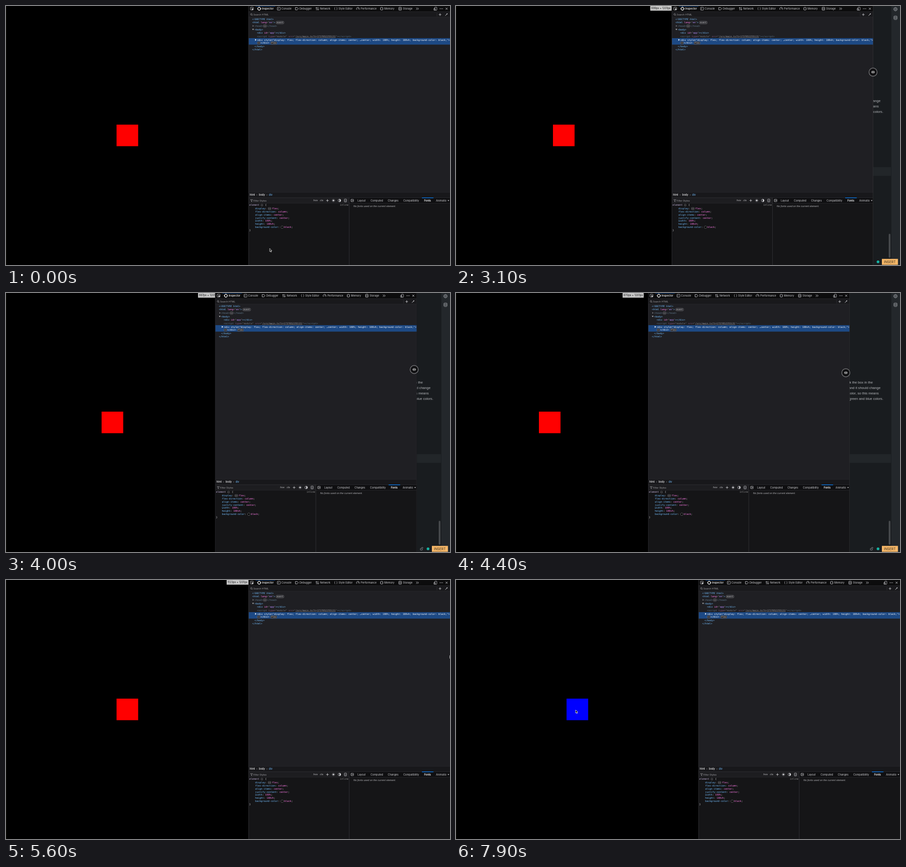
These frames come from a looping animation (980x572 px, 8 s). An HTML page with a canvas:

```html
<!DOCTYPE html>
<html lang="en">
<head>
<meta charset="utf-8">
<title>Resize and click</title>
<style>
html, body { margin: 0; width: 100%; height: 100%; overflow: hidden; background: #000; }
canvas { display: block; width: 980px; height: 572px; }
</style>
</head>
<body>
<canvas id="stage" width="980" height="572"></canvas>
<script>
const ctx = document.getElementById('stage').getContext('2d');
const LOOP = 8000, STEP = 100, PANE = 535, LAG = 29;
const UI = 'Inter, "Noto Sans", sans-serif';
const MONO = '"DejaVu Sans Mono", monospace';
const CH = 3.155;
const BLUE = '#75bfff', PINK = '#ff7de9', VIOLET = '#b98eff', GREY = '#939395', LIGHT = '#d7d7db', DIM = '#77777c';

// Window edge offset: turning points of the drag
const drag = [[1850, 0], [2300, -260], [2550, -100], [2800, -185], [3085, -58.5], [3400, -140],
  [3700, -16], [4300, -131], [4660, -20], [5060, -105], [5370, 0]];
// Pointer paths: time, x, y
const gripPath = [[1850, 980, 150], [2300, 712, 148], [2550, 872, 147], [2800, 790, 146], [3085, 921, 146],
  [3400, 835, 150], [3700, 961, 162], [4300, 841, 176], [4660, 950, 177], [5060, 849, 177], [5370, 980, 170]];
const arrowPath = [[0, 582, 535.5], [200, 582, 535], [850, 258, 284], [1000, 264, 287], [1300, 264, 287], [1650, 990, 160]];
const returnPath = [[5700, 990, 170], [6300, 248, 298], [6800, 228, 300], [7200, 262, 290], [7500, 264, 287]];

function track(keys, t, i = 1) {
  if (t <= keys[0][0]) return keys[0][i];
  for (let k = 1; k < keys.length; k++) {
    const a = keys[k - 1], b = keys[k];
    if (t <= b[0]) {
      const p = (t - a[0]) / (b[0] - a[0]);
      return a[i] + (b[i] - a[i]) * (1 - Math.cos(Math.PI * p)) / 2;
    }
  }
  return keys[keys.length - 1][i];
}

const follow = (path, t) => [track(path, t), track(path, t, 2)];

function rect(x, y, w, h, color) {
  ctx.fillStyle = color;
  ctx.fillRect(x, y, w, h);
}

function disc(x, y, r, color) {
  ctx.fillStyle = color;
  ctx.beginPath();
  ctx.arc(x, y, r, 0, 7);
  ctx.fill();
}

function text(s, x, y, color, size = 5.6, font = UI, style = '', align = 'left') {
  ctx.font = `${style} ${size}px ${font}`;
  ctx.fillStyle = color;
  ctx.textAlign = align;
  ctx.fillText(s, x, y);
}

// Runs of code: text, color, text, color ...
function code(x, y, ...runs) {
  for (let i = 0; i < runs.length; i += 2) {
    text(runs[i], x, y + 1.8, runs[i + 1], 5.24, MONO);
    x += runs[i].length * CH;
  }
}

function line(color, width, ...pts) {
  ctx.strokeStyle = color;
  ctx.lineWidth = width;
  ctx.beginPath();
  for (let i = 0; i < pts.length; i += 2) ctx.lineTo(pts[i], pts[i + 1]);
  ctx.stroke();
}

function ring(x, y, r, color, width = 0.8, from = 0, to = Math.PI * 2) {
  ctx.strokeStyle = color;
  ctx.lineWidth = width;
  ctx.beginPath();
  ctx.arc(x, y, r, from, to);
  ctx.stroke();
}

function box(x, y, w, h, r, color, width = 0.8) {
  ctx.strokeStyle = color;
  ctx.lineWidth = width;
  ctx.beginPath();
  ctx.roundRect(x, y, w, h, r);
  ctx.stroke();
}

function poly(fill, ...pts) {
  ctx.fillStyle = fill;
  ctx.beginPath();
  for (let i = 0; i < pts.length; i += 2) ctx.lineTo(pts[i], pts[i + 1]);
  ctx.closePath();
  ctx.fill();
}

function dots(x, y, gap, r, color) {
  for (let i = -1; i < 2; i++) disc(x + i * gap, y, r, color);
}

function plus(x, y, r, color) {
  line(color, 0.9, x - r, y, x + r, y);
  line(color, 0.9, x, y - r, x, y + r);
}

function rays(x, y, from, to, color, width) {
  for (let i = 0; i < 8; i++) {
    const u = Math.cos(i * Math.PI / 4), v = Math.sin(i * Math.PI / 4);
    line(color, width, x + from * u, y + from * v, x + to * u, y + to * v);
  }
}

function pill(s, x, y, w) {
  ctx.fillStyle = '#29292d';
  ctx.beginPath();
  ctx.roundRect(x, y - 3, w, 6, 2.5);
  ctx.fill();
  box(x, y - 3, w, 6, 2.5, '#8f8f94', 0.5);
  if (s) text(s, x + w / 2, y + 1.6, '#e0e0e4', 4.7, MONO, '', 'center');
  else dots(x + w / 2, y, 1.5, 0.5, '#e0e0e4');
}

function database(x, y, c, w = 3.2) {
  for (const d of [-3, -1, 1, 3]) {
    ctx.strokeStyle = c;
    ctx.lineWidth = 0.8;
    ctx.beginPath();
    ctx.ellipse(x, y + d, w, 1.1, 0, d < -2 ? Math.PI : 0, d < -2 ? Math.PI * 3 : Math.PI);
    ctx.stroke();
  }
  line(c, 0.8, x - w, y - 3, x - w, y + 3);
  line(c, 0.8, x + w, y - 3, x + w, y + 3);
}

function editor() {
  rect(600, 0, 380, 572, '#191c1f');
  rect(600, 356, 360, 19, '#222629');
  rect(961, 0, 19, 572, '#23272b');
  [['Click the box in the', 920, 197], ['center and it should change', 937, 209],
    ['its color, so this means', 933, 221], ['red, green and blue colors.', 943, 233]].forEach(([s, x, y]) =>
    text(s, x, y + 2.6, '#b5b7bb', 7.6, '"Liberation Sans", sans-serif', '', 'right'));
  const c = '#a2a5aa';
  ring(970, 7, 3.6, c, 1);
  ring(970, 7, 1.5, c, 0.8);
  rays(970, 7, 3.5, 4.4, c, 0.9);
  database(970, 26, c, 3.5);
  ctx.fillStyle = '#44474a';
  ctx.beginPath();
  ctx.roundRect(955, 503, 4, 53, 2);
  ctx.fill();
  box(914.5, 564, 4.5, 3.8, 0.7, c);
  ring(919, 563.5, 1.7, c, 0.8, Math.PI, Math.PI * 2);
  disc(931.5, 565, 3, '#16b3a4');
  rect(940, 558.5, 35.5, 13, '#f6b768');
  text('INSERT', 957.5, 567.7, '#39301f', 7.2, UI, '', 'center');
}

function toolbar() {
  rect(535, 0, 445, 12, '#0c0c0d');
  rect(551, 0, 43, 1, '#0b3f82');
  rect(535, 12, 445, 0.6, '#38383d');
  const c = '#cfcfd3';
  [['Console', 608], ['Debugger', 648], ['Network', 693], ['Style Editor', 734],
    ['Performance', 783], ['Memory', 835], ['Storage', 876]].forEach(([s, x]) => text(s, x, 8, c, 5.7));
  text('Inspector', 565, 8, '#fff', 5.7, UI, '500');
  box(539.5, 2.7, 6.5, 6.2, 1, c);
  poly('#fff', 542, 4.8, 546.5, 7, 544.3, 7.4, 543.6, 9.8);
  box(556, 3.2, 5.6, 5.6, 1.4, '#fff', 1.1);
  for (const d of [-3.6, 3.6]) {
    line('#fff', 1, 558.8 + d, 5, 558.8 + d, 7);
    line('#fff', 1, 557.8, 6 + d, 559.8, 6 + d);
  }
  box(598.8, 2.8, 6.6, 6.4, 1, c);
  line(c, 0.8, 600.4, 4.5, 602, 6, 600.4, 7.5);
  line(c, 0.9, 638.8, 3.4, 643, 3.4, 645.4, 6, 643, 8.6, 638.8, 8.6, 638.8, 3.1);
  line(c, 0.9, 685.2, 9.4, 685.2, 2.9);
  line(c, 0.9, 683.6, 4.7, 685.2, 2.9, 686.8, 4.7);
  line(c, 0.9, 688.7, 2.6, 688.7, 9.1);
  line(c, 0.9, 687.1, 7.3, 688.7, 9.1, 690.3, 7.3);
  text('{ }', 728, 8.2, c, 6.8, UI, '', 'center');
  ring(776.7, 6.3, 3.3, c, 0.9, Math.PI * 0.8, Math.PI * 2.2);
  line(c, 0.9, 776.5, 7, 778.3, 4.4);
  box(827, 3, 4.4, 6, 1, c);
  for (const y of [4.3, 6, 7.7]) {
    line(c, 0.6, 825.7, y, 827, y);
    line(c, 0.6, 831.4, y, 832.7, y);
  }
  box(867, 2.6, 5.8, 6.8, 1, c);
  for (const y of [5, 7.2]) line(c, 0.7, 867, y, 872.8, y);
  for (const x of [905.3, 908.3]) line(c, 0.9, x, 3.6, x + 2.3, 6, x, 8.4);
  box(946.3, 2.6, 4.6, 6.8, 0.8, c);
  box(944.3, 5.3, 3, 4.1, 0.6, c);
  dots(960.8, 6, 2.7, 0.8, c);
  line(c, 0.9, 970.3, 3.8, 974.7, 8.2);
  line(c, 0.9, 970.3, 8.2, 974.7, 3.8);
}

function markup() {
  rect(535, 12.6, 445, 12, '#19191c');
  rect(535, 24.5, 445, 0.5, '#303035');
  ring(541.5, 18.4, 1.8, '#b1b1b3', 0.7);
  line('#b1b1b3', 0.8, 542.8, 19.7, 544.4, 21.3);
  text('Search HTML', 546, 20.9, '#a0a0a4', 5.24);
  rect(950.8, 15, 0.6, 8, '#38383d');
  plus(958, 19, 2.8, '#cfcfd3');
  line('#cfcfd3', 1, 969.5, 21.5, 973, 18);
  line('#cfcfd3', 1.7, 972.5, 18.5, 974.3, 16.7);

  text('<!DOCTYPE html>', 543.5, 30.8, BLUE, 5.24, MONO, 'italic');
  code(543.5, 36.5, '<html ', BLUE, 'lang', PINK, '="', GREY, 'en', VIOLET, '"', GREY, '>', BLUE);
  pill('event', 596, 36.6, 17.5);
  poly(DIM, 544.4, 42.1, 547.2, 44, 544.4, 45.9);
  code(548.5, 44, '<head>', '#5b7285');
  pill('', 568, 44.2, 7);
  code(576, 44, '</head>', '#5b7285');
  poly('#b1b1b3', 543.3, 50.6, 547.3, 50.6, 545.3, 53.5);
  code(548.5, 51.8, '<body>', BLUE);
  code(554, 59.5, '<div ', BLUE, 'id', PINK, '="', GREY, 'app', VIOLET, '"', GREY, '></div>', BLUE);
  code(554, 67, '<script ', '#5b7285', 'type', '#80577e', '="module" ', DIM, 'src', '#80577e', '="', DIM,
    '/src/main.ts?t=1737052255131', '#9a9aa0', '"', DIM, '><\/script>', '#5b7285');
  line('#9a9aa0', 0.4, 554 + 27 * CH, 69.8, 554 + 55 * CH, 69.8);
  rect(535.6, 71, 445, 14.3, '#1d4984');
  poly('#fff', 549.8, 72.7, 552.8, 74.8, 549.8, 76.9);
  code(554, 74.8, '<div style="display: flex; flex-direction: column; align-items: center; …center; ' +
    'width: 100%; height: 100vh; background-color: black;">', '#fff');
  pill('', 554.3, 81.6, 7);
  code(562, 81.5, '</div>', '#fff');
  pill('flex', 584, 81.6, 14);
  code(548.5, 89, '</body>', BLUE);
  code(543.5, 96.6, '</html>', BLUE);
}

function rules() {
  rect(535, 411, 445, 0.6, '#38383d');
  rect(535, 411.6, 445, 11.6, '#18181b');
  text('html', 538, 419, '#f0f0f2', 5.5, UI, '500');
  text('body', 558.3, 419, '#f0f0f2', 5.5, UI, '500');
  text('div', 580.3, 419, BLUE, 5.5);
  for (const x of [553, 575.3]) line(GREY, 0.7, x, 416, x + 1.3, 417.3, x, 418.6);
  rect(535, 423, 222, 12, '#1d1d20');
  rect(757, 423, 223, 12, '#0f0f11');
  rect(535, 423, 445, 0.6, '#38383d');
  rect(535, 435, 445, 137, '#151517');
  rect(535, 435, 445, 0.6, '#303035');
  rect(757, 423, 0.8, 149, '#38383d');

  const c = '#cfcfd3';
  line('#a0a0a4', 0.7, 539.6, 427.5, 544.4, 427.5, 542.6, 429.8, 542.6, 432.5, 541.4, 431.8, 541.4, 429.8, 539.6, 427.5);
  text('Filter Styles', 546, 431.5, '#a0a0a4', 5.24);
  text(':hov', 677.5, 431.4, c, 5.3);
  text('.cls', 691.7, 431.4, c, 5.3);
  plus(709.5, 429.6, 2.8, c);
  disc(722.7, 429.5, 1.8, c);
  rays(722.7, 429.5, 2.3, 3.6, c, 0.7);
  ring(736, 429.5, 3, c);
  ctx.fillStyle = c;
  ctx.beginPath();
  ctx.arc(736, 429.5, 3, -Math.PI / 2, Math.PI / 2);
  ctx.fill();
  box(746.7, 426.4, 5, 6.3, 1, c);
  line(c, 0.6, 748, 429, 750.3, 429);
  line(c, 0.6, 748, 430.7, 750.3, 430.7);
  box(761.3, 426.8, 6, 5.4, 0.7, c, 0.7);
  line(c, 0.6, 763, 426.8, 763, 432.2);
  poly(c, 766.2, 428, 766.2, 431, 764.2, 429.5);
  [['Layout', 776], ['Computed', 804.7], ['Changes', 842.8], ['Compatibility', 877],
    ['Animatio', 949]].forEach(([s, x]) => text(s, x, 431.5, c, 5.6));
  rect(918, 423, 25.5, 1.3, '#0a84ff');
  text('Fonts', 923, 431.5, '#fff', 5.6, UI, '600');
  poly(c, 974.7, 428.7, 978.3, 428.7, 976.5, 431);
  text('No fonts used on the current element.', 767, 444, '#b8b8bc', 5.24, UI, 'italic');

  code(537, 439.5, 'element', '#c8b8e0');
  box(563, 437.9, 3.6, 3.6, 0.5, GREY, 0.6);
  code(572, 439.5, '{', LIGHT);
  text('inline', 756, 441.3, GREY, 5.24, MONO, '', 'right');
  code(550, 447.4, 'display', BLUE, ':', LIGHT);
  box(578.7, 445.2, 6, 4.4, 0.7, '#8f8f94', 0.6);
  dots(581.7, 447.4, 1.5, 0.5, LIGHT);
  code(587, 447.4, 'flex', PINK, ';', LIGHT);
  [['flex-direction', 'column'], ['align-items', 'center'], ['justify-content', 'center'],
    ['width', '100%'], ['height', '100vh']].forEach(([k, v], i) =>
    code(550, 454.2 + i * 6.8, k, BLUE, ': ', LIGHT, v, PINK, ';', LIGHT));
  code(550, 488.3, 'background-color', BLUE, ':', LIGHT);
  disc(609.5, 488.5, 2.7, '#000');
  ring(609.5, 488.5, 2.7, '#9a9a9e', 0.6);
  code(614, 488.3, 'black', PINK, ';', LIGHT);
  code(537, 494.8, '}', LIGHT);
}

function devtools(dx) {
  ctx.save();
  ctx.translate(dx, 0);
  ctx.beginPath();
  ctx.rect(535, 0, 445, 572);
  ctx.clip();
  rect(535, 0, 445, 572, '#1f1f23');
  toolbar();
  markup();
  rules();
  rect(535, 0, 0.7, 572, '#38383d');
  if (dx < 0) rect(979.3, 0, 0.7, 572, '#3a3a3c');
  ctx.restore();
}

// The page relayouts slightly after the window edge has moved
function page(t, edge) {
  const w = PANE + track(drag, t - LAG);
  const blue = (t >= 1000 && t < 1300) || t >= 7400;
  rect(0, 0, edge, 572, '#000');
  rect(0, 0, 0.7, 572, '#1b1b12');
  rect(Math.round(w / 2 - 23.8), 262, 47.7, 47.6, blue ? '#00f' : '#f00');
  if (t >= 2000 && t < 6100) {
    const s = `${Math.floor(w * 2.1)}px × 1201px`;
    ctx.font = `5.8px ${UI}`;
    const tw = ctx.measureText(s).width + 4;
    rect(w - tw, 0, tw, 10.3, '#c9c9c9');
    text(s, w - tw + 2, 7.2, '#18181a', 5.8);
  }
}

function arrow([x, y]) {
  ctx.beginPath();
  [0, 0, 0, 6.8, 1.6, 5.4, 2.7, 8, 3.8, 7.5, 2.7, 5, 4.9, 5].forEach((v, i, p) => {
    if (i % 2) ctx.lineTo(x + p[i - 1], y + v);
  });
  ctx.closePath();
  ctx.fillStyle = '#000';
  ctx.fill();
  ctx.strokeStyle = '#fff';
  ctx.lineWidth = 0.8;
  ctx.stroke();
}

function grip([x, y]) {
  disc(x, y, 9, '#111113');
  ring(x, y, 9, '#77777a', 1.4);
  for (const s of [-1, 1]) line('#fff', 0.9, x + s * 1.2, y - 2.4, x + s * 3.6, y, x + s * 1.2, y + 2.4, x + s * 1.2, y - 2.4);
}

function cursor(t) {
  if (t < 1700) arrow(follow(arrowPath, t));
  else if (t >= 5700) arrow(follow(returnPath, t));
  else if (t >= 1900 && t < 5500) grip(follow(gripPath, t));
  else if (t >= 5500) rect(979, 166.5, 1, 7, '#c0c0c0');
}

function frame(now) {
  const t = Math.floor((now % LOOP) / STEP) * STEP;
  const dx = track(drag, t);
  editor();
  page(t, 980 + dx);
  devtools(dx);
  cursor(t);
  requestAnimationFrame(frame);
}
requestAnimationFrame(frame);
</script>
</body>
</html>
```
